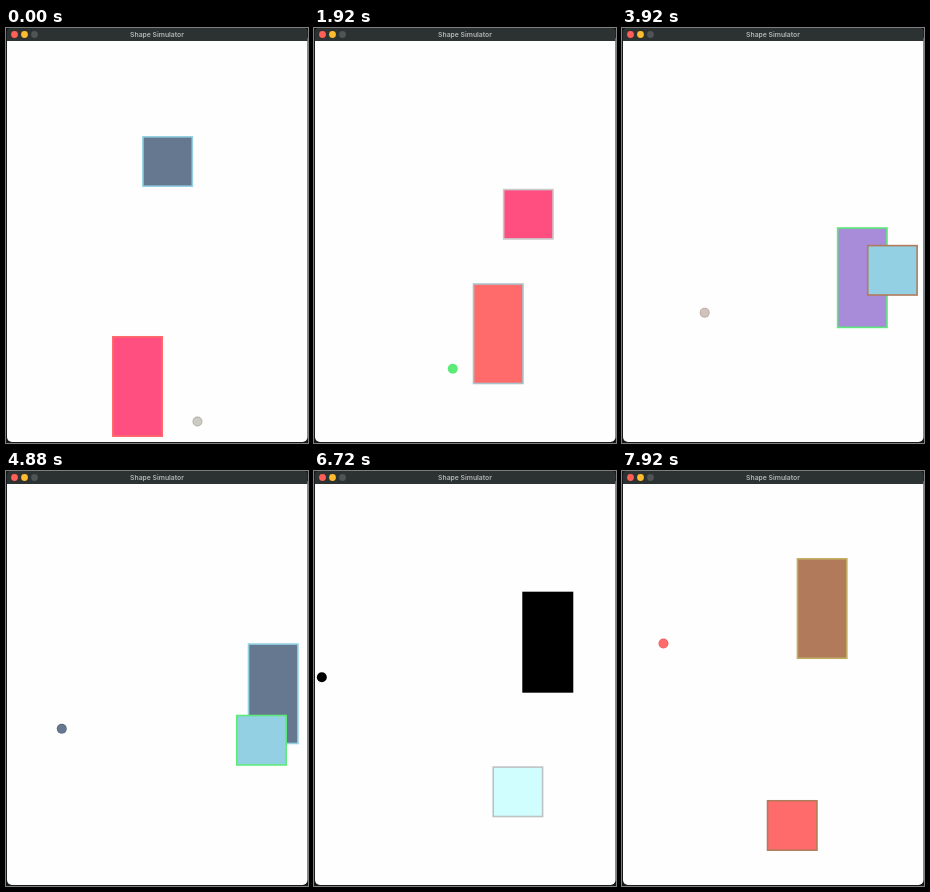
An HTML page with a canvas for the animation above (8 s loop, 302 by 415 pixels).

```html
<!DOCTYPE html>
<html lang="en">
<head>
<meta charset="utf-8">
<title>Shape Simulator</title>
<style>
  html, body { margin: 0; width: 100%; height: 100%; overflow: hidden; background: #16191a; }
  canvas { display: block; width: 302px; height: 415px; }
</style>
</head>
<body>
<canvas id="stage" width="302" height="415"></canvas>
<script>
const ctx = document.getElementById('stage').getContext('2d');
const LOOP = 8000, STEP = 80, SPEED = 2.243;

const slate = '#66788f', sky = '#93d0e3', pink = '#ff4f81', coral = '#ff6b6b',
      violet = '#a88bd9', green = '#5cea78', brown = '#b17a5b', black = '#000',
      cyan = '#d0fdfd', silver = '#c9cacb', stone = '#cbcac3';

// Each palette: [fill, border] for the rectangle, square and ball.
const palettes = [
  { from: 0,    rect: [pink, coral],    square: [slate, sky],   ball: [stone, '#b5b0a7'] },
  { from: 1000, rect: [coral, '#a9c1c8'], square: [pink, silver], ball: [green, green] },
  { from: 2500, rect: [violet, green],  square: [sky, brown],   ball: ['#cfc4bd', '#bda79c'] },
  { from: 4000, rect: [slate, sky],     square: [sky, green],   ball: [slate, '#59697e'] },
  { from: 5500, rect: [black, black],   square: [cyan, '#bdc3c3'], ball: [black, black] },
  { from: 7000, rect: [brown, '#c0ad62'], square: [coral, brown], ball: [coral, '#e8646a'] }
];

const bounceMax = (v, wall) => v > wall ? 2 * wall - v : v;
const bounceMin = (v, wall) => v < wall ? 2 * wall - v : v;

function disc(x, y, r, fill) {
  ctx.fillStyle = fill;
  ctx.beginPath();
  ctx.arc(x, y, r, 0, Math.PI * 2);
  ctx.fill();
}

function box(x, y, w, h, [fill, border], line = 1.6) {
  ctx.fillStyle = border;
  ctx.fillRect(x, y, w, h);
  ctx.fillStyle = fill;
  ctx.fillRect(x + line, y + line, w - 2 * line, h - 2 * line);
}

function ball(x, y, r, [fill, border]) {
  disc(x, y, r, border);
  disc(x, y, r - 0.9, fill);
}

function drawWindow() {
  ctx.fillStyle = '#16191a';
  ctx.fillRect(0, 0, 302, 415);
  ctx.fillStyle = '#fefefe';
  ctx.beginPath();
  ctx.roundRect(1, 10, 300.5, 404, [0, 0, 5, 5]);
  ctx.fill();
  ctx.fillStyle = '#2c3132';
  ctx.beginPath();
  ctx.roundRect(1, 0, 300.5, 13, [4, 4, 0, 0]);
  ctx.fill();
  disc(8.5, 6.5, 3.4, '#ff5f57');
  disc(18.5, 6.5, 3.4, '#febc2e');
  disc(28.5, 6.5, 3.4, '#505454');
  ctx.fillStyle = '#b4b7b7';
  ctx.font = '600 6.8px Inter, "Liberation Sans", sans-serif';
  ctx.textAlign = 'center';
  ctx.textBaseline = 'alphabetic';
  ctx.fillText('Shape Simulator', 151, 8.9);
}

function draw(ms) {
  const t = ms % LOOP;
  const d = Math.max(0.5, Math.floor(t / STEP)) * SPEED;
  const colors = palettes.findLast(p => t >= p.from);
  drawWindow();
  ctx.save();
  ctx.beginPath();
  ctx.rect(1, 13, 301, 401);
  ctx.clip();
  box(bounceMax(104.9 + d, 250.8), 309.1 - d, 51, 101, colors.rect);
  box(bounceMax(135 + d, 250.9), 106.9 + d, 51, 51, colors.square);
  ball(bounceMin(192.6 - d, 6), 394.6 - d, 5, colors.ball);
  ctx.restore();
}

const start = performance.now();
function tick() {
  draw(performance.now() - start);
  requestAnimationFrame(tick);
}
tick();
</script>
</body>
</html>
```
